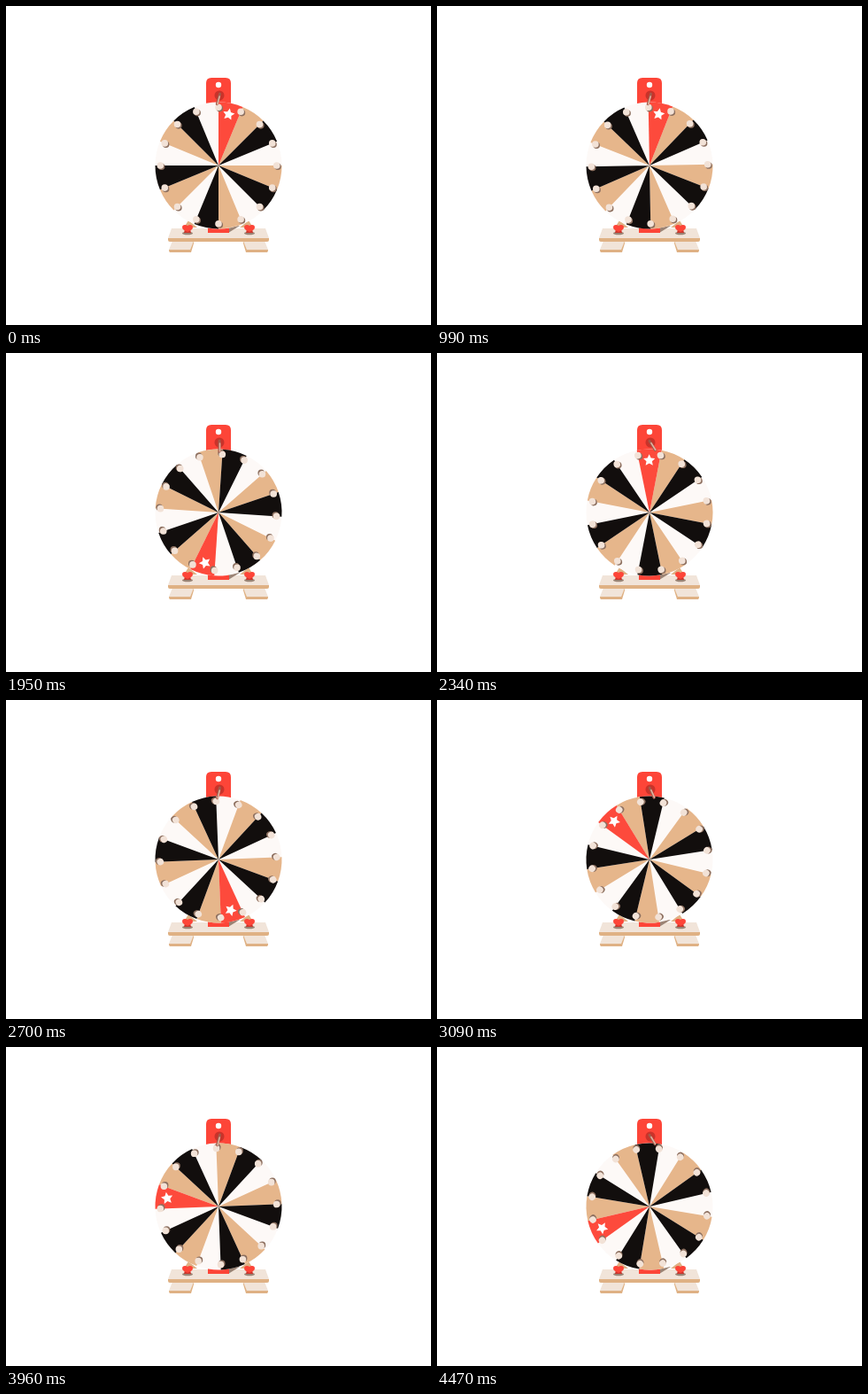
These frames come from a looping animation (480 by 360 pixels, 4.5 s). An HTML page without scripts:

```html
<!DOCTYPE html>
<html lang="en">
<head>
<meta charset="utf-8">
<title>Prize wheel</title>
<style>
  /* Degrees the wheel has turned anticlockwise */
  @property --spin { syntax: "<number>"; inherits: true; initial-value: 0; }

  html, body { margin: 0; width: 100%; height: 100%; overflow: hidden; background: #fff; }
  svg { display: block; width: 100vw; height: 100vh; animation: spin 4.5s infinite; }

  .wheel { transform: rotate(calc(var(--spin) * -1deg)); }
  /* The flapper swings once for every peg that passes */
  .flapper { transform: rotate(calc(-8deg + 24deg * cos(var(--spin) * 16deg - 10deg))); }

  .slices circle { fill: none; stroke-width: 71.5; stroke-dasharray: 1 2; }
  .pegs { fill: none; stroke-width: 7.6; stroke-linecap: round; stroke-dasharray: 0 1; }
  .red { fill: #fd4538; }
  .wood { fill: #f1e4d9; }
  .edge { fill: #dfb184; }
  .shade { fill: #9b8374; }

  @keyframes spin {
    0% { --spin: 0; animation-timing-function: cubic-bezier(.333, 0, .667, 0); }
    22% { --spin: 1.05; animation-timing-function: cubic-bezier(.333, .013, .667, .16); }
    34.667% { --spin: 46.3; animation-timing-function: cubic-bezier(.333, .16, .667, .57); }
    52% { --spin: 371; animation-timing-function: cubic-bezier(.333, .34, .667, .66); }
    68.667% { --spin: 773.4; animation-timing-function: cubic-bezier(.333, .39, .667, .88); }
    88% { --spin: 1172; animation-timing-function: cubic-bezier(.333, .84, .667, .97); }
    99.333%, 100% { --spin: 1205.6; }
  }
</style>
</head>
<body>
<svg viewBox="0 0 480 360">
  <defs>
    <g id="foot">
      <path class="wood" d="M188 265h24l-4 10h-24z"/>
      <path class="edge" d="M184 275h24l4-10v3l-3 10h-24q-1 0-1-3z"/>
    </g>
    <g id="knob">
      <ellipse class="shade" cx="205" cy="256.500" rx="6" ry="1.800"/>
      <path fill="#c9352b" d="M202 252h6l1 4h-8z"/>
      <path class="red" d="M199 250q0-3 3-3 2 0 3 1 1-1 3-1 3 0 3 3 0 2-3 3.500l-3 1.500-3-1.500q-3-1.500-3-3.500z"/>
    </g>
    <circle id="peg-ring" r="65.700" pathLength="16"/>
  </defs>

  <!-- Stand -->
  <use href="#foot"/>
  <use href="#foot" transform="matrix(-1 0 0 1 480 0)"/>
  <path class="wood" d="M187 251h106l4 11H183z"/>
  <path class="edge" d="M183 262h114v2q0 2-2 2H185q-2 0-2-2z"/>
  <path class="edge" d="M201 250l5-8 10 8zM279 250l-5-8-10 8z"/>
  <path class="shade" d="M251 256l13-8-12 1z"/>
  <path class="red" d="M226 87q0-6 6-6h16q6 0 6 6v50h-28zM228 248h24v8h-24z"/>
  <circle cx="240" cy="89" r="3.200" fill="#fff"/>

  <g transform="translate(240 180)">
    <g class="wheel">
      <circle r="71.500" fill="#fdf9f7"/>
      <g class="slices" transform="rotate(-90)">
        <circle r="35.750" pathLength="16" stroke="#e6b68b" stroke-dashoffset="-1"/>
        <circle r="35.750" pathLength="16" stroke="#120e0d" stroke-dashoffset="-2"/>
        <circle r="35.750" pathLength="16" stroke="#fd4a3c" style="stroke-dasharray: 1 15"/>
      </g>
      <path transform="rotate(11.250) translate(0 -59)" fill="#fff"
        d="M0-6.800l2 4.200 4.600.600-3.400 3.200.900 4.600L0 3.600l-4.100 2.200.900-4.600L-6.600-2l4.600-.600z"/>
      <use href="#peg-ring" class="pegs" stroke="#8d7060" transform="translate(1.300 1.300)"/>
      <use href="#peg-ring" class="pegs" stroke="#f2e2d7"/>
    </g>
  </g>

  <g transform="translate(241 101)">
    <circle r="5.500" fill="#c9332a"/>
    <g class="flapper">
      <path d="M0-2V10" stroke="#a45a4a" stroke-width="3" stroke-linecap="round"/>
      <path d="M.500 1V10" stroke="#dfb5a3" stroke-width="1.600" stroke-linecap="round"/>
    </g>
  </g>

  <use href="#knob"/>
  <use href="#knob" x="70"/>
</svg>
</body>
</html>
```
